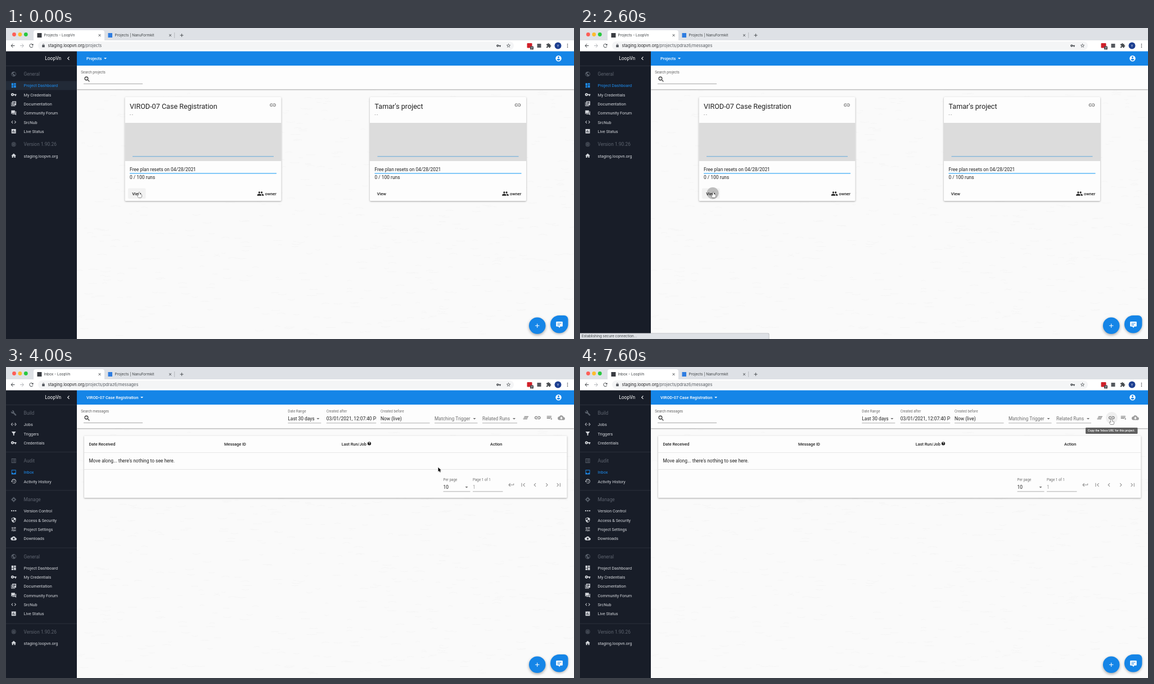
An HTML page with a canvas that plays this animation: 1010x554 px, repeating every 8 s.

```html
<!DOCTYPE html>
<html lang="en">
<head>
<meta charset="utf-8">
<title>Project inbox</title>
<style>
  html, body { margin: 0; width: 100%; height: 100%; overflow: hidden; background: #f9f9f9; }
  canvas { display: block; width: 1010px; height: 554px; }
</style>
</head>
<body>
<canvas id="stage"></canvas>
<script>
const W = 1010, H = 554, LOOP = 8000, STEP = 200;
const BLUE = '#1585e7', INK = '#212121', GREY = '#6e6e6e', PALE = '#9c9c9c';
const UI = 'Inter, "Open Sans", sans-serif', PAGE = 'Roboto, sans-serif';
const SMALL = 6.3, BODY = 7.36, LARGE = 8.42, TITLE = 12.6;

const canvas = document.getElementById('stage');
const dpr = window.devicePixelRatio || 1;
canvas.width = W * dpr;
canvas.height = H * dpr;
const ctx = canvas.getContext('2d');

// Icons live on a 24 unit grid and are filled even-odd.
const disc = (x, y, r) => `M${x - r} ${y}a${r} ${r} 0 1 0 ${2 * r} 0a${r} ${r} 0 1 0 ${-2 * r} 0z`;
const box = (x, y, w, h) => `M${x} ${y}h${w}v${h}h${-w}z`;
const cloud = 'M19.3 10A7.5 7.5 0 0 0 5.3 8 6 6 0 0 0 6 20h13a5 5 0 0 0 .3-10z';
const shapes = {
  dashboard: box(3, 3, 8, 10) + box(3, 15, 8, 6) + box(13, 11, 8, 10) + box(13, 3, 8, 6),
  key: disc(7, 12, 6) + disc(7, 12, 2) + box(13, 10, 10, 4) + box(17, 14, 4, 4),
  books: 'M4 6H2v16h16v-2H4z' + box(6, 2, 16, 16) + box(9, 5, 10, 2) + box(9, 9, 10, 2) + box(9, 13, 6, 2),
  forum: 'M22 6h-3v9H6v3h12l4 4zM17 2H2v15l4-4h11z',
  code: 'M9.4 16.6L4.8 12l4.6-4.6L8 6l-6 6 6 6zM14.6 16.6l4.6-4.6-4.6-4.6L16 6l6 6-6 6z',
  chart: box(3, 3, 18, 18) + box(7, 10, 2, 7) + box(11, 7, 2, 10) + box(15, 13, 2, 4),
  home: 'M10 20v-6h4v6h5v-8h3L12 3 2 12h3v8z',
  globe: disc(12, 12, 10) + 'M11 19.9C7 19.4 4 16 4 12l.2-1.8L9 15v1l2 2zM18 17.4L16 16h-1v-4H8v-2h3V7h3l1-2.4c3 1.2 5 4 5 7.4 0 2-.8 4-2 5.4z',
  wrench: 'M22.7 19l-9.1-9.1A6.6 6.6 0 0 0 4.7 1.7L9 6 6 9 1.6 4.7a6.6 6.6 0 0 0 8.2 8.9l9.1 9.1h1.4l2.4-2.4z',
  jobs: 'M7.8 6.8L6.2 5.5.8 12l5.4 6.5 1.6-1.3L3.4 12zM16.2 6.8l1.6-1.3 5.4 6.5-5.4 6.5-1.6-1.3 4.4-5.2z' + box(7, 11, 2, 2) + box(11, 11, 2, 2) + box(15, 11, 2, 2),
  funnel: 'M3 4h18l-7 9v7h-4v-7z',
  list: box(3, 3, 18, 18) + box(5, 5, 14, 14) + [7, 11, 15].map(y => box(7, y, 2, 2) + box(11, y, 6, 2)).join(''),
  inbox: box(3, 3, 18, 18) + 'M5 5h14v10h-4a3 3 0 0 1-6 0H5z',
  history: 'M13 3a9 9 0 0 0-9 9H1l4 4 4-4H6a7 7 0 1 1 2 5l-1.4 1.4A9 9 0 1 0 13 3zM12 8v5l4.3 2.5.7-1.2-3.5-2.1V8z',
  gear: disc(12, 12, 7.5) + disc(12, 12, 3.5) + box(10, 2, 4, 2.8) + box(10, 19.2, 4, 2.8) + box(2, 10, 2.8, 4) + box(19.2, 10, 2.8, 4),
  dots: disc(4, 12, 2.6) + disc(12, 12, 2.6) + disc(20, 12, 2.6),
  shield: 'M12 1L3 5v6c0 5.5 3.8 10.7 9 12 5.2-1.3 9-6.5 9-12V5zM12 12h7c-.5 4.1-3.3 7.8-7 8.9V12H5V6.3l7-3.1z',
  tune: box(3, 5, 10, 2) + box(15, 3, 2, 6) + box(17, 5, 4, 2) + box(3, 11, 4, 2) + box(7, 9, 2, 6) + box(11, 11, 10, 2) + box(3, 17, 6, 2) + box(11, 15, 2, 6) + box(13, 17, 8, 2),
  cloud: cloud + 'M17 13l-5 5-5-5h3V9h4v4z',
  print: disc(12, 12, 9) + disc(12, 12, 7.6) + disc(12, 12, 6) + disc(12, 12, 4.4) + disc(12, 12, 2.8),
  search: disc(9.5, 9.5, 6.5) + disc(9.5, 9.5, 4.5) + 'M14 15.5l1.5-1.5 5 5-1.5 1.5z',
  link: 'M11 7H7a5 5 0 0 0 0 10h4v-1.9H7a3.1 3.1 0 0 1 0-6.2h4zM13 7h4a5 5 0 0 1 0 10h-4v-1.9h4a3.1 3.1 0 0 0 0-6.2h-4z' + box(8, 11, 8, 2),
  group: disc(8, 8, 3) + disc(16, 8, 3) + 'M8 13c-2.3 0-7 1.2-7 3.5V19h14v-2.5C15 14.2 10.3 13 8 13zM16 13l-1 .1c1.2.8 2 2 2 3.4V19h6v-2.5c0-2.3-4.7-3.5-7-3.5z',
  account: disc(12, 12, 10) + disc(12, 8, 3) + 'M12 19.2a7 7 0 0 1-6-3.2c0-2 4-3.1 6-3.1s6 1.100 6 3.1a7 7 0 0 1-6 3.2z',
  back: 'M20 11H7.800l5.600-5.600L12 4l-8 8 8 8 1.400-1.400L7.800 13H20z',
  reload: 'M17.600 6.400A8 8 0 1 0 19.700 14h-2.100A6 6 0 1 1 12 6c1.700 0 3.100.7 4.200 1.800L13 11h7V4z',
  lock: box(4, 8, 16, 14) + 'M7 8V6a5 5 0 0 1 10 0v2h-2V6a3 3 0 0 0-6 0v2z',
  star: 'M22 9.2l-7.2-.6L12 2 9.200 8.600 2 9.200 7.500 14 5.800 21 12 17.300 18.200 21l-1.700-7zM12 15.400l-3.800 2.300 1-4.300-3.300-2.900 4.400-.4L12 6.100l1.700 4 4.400.4-3.300 2.900 1 4.300z',
  puzzle: 'M20.500 11H19V5h-6V3.500a2.500 2.500 0 0 0-5 0V5H2v5.800h1.500a2.700 2.700 0 0 1 0 5.400H2V22h5.800v-1.500a2.700 2.700 0 0 1 5.400 0V22H19v-6h1.500a2.500 2.500 0 0 0 0-5z',
  kebab: disc(12, 5, 2.2) + disc(12, 12, 2.2) + disc(12, 19, 2.2),
  left: 'M15.400 7.400L14 6l-6 6 6 6 1.400-1.400-4.600-4.600z',
  right: 'M10 6L8.600 7.400l4.600 4.600-4.600 4.600L10 18l6-6z',
  first: 'M18.400 7.400L17 6l-6 6 6 6 1.400-1.400-4.600-4.600z' + box(6, 6, 2, 12),
  last: 'M7 6L5.600 7.400l4.600 4.600-4.600 4.600L7 18l6-6z' + box(16, 6, 2, 12),
  enter: 'M19 7v4H5.800l3.600-3.600L8 6l-6 6 6 6 1.400-1.400L5.800 13H21V7z',
  clear: box(7, 7, 14, 2) + box(5, 11, 14, 2) + box(3, 15, 14, 2),
  queue: box(2, 5, 17, 2) + box(2, 9, 17, 2) + box(2, 13, 13, 2) + 'M17 13v6l5-3z',
  drop: 'M7 10l5 5 5-5z',
  close: 'M19 6.400L17.600 5 12 10.600 6.400 5 5 6.400l5.600 5.600L5 17.600 6.400 19l5.600-5.600 5.600 5.600 1.400-1.400-5.600-5.600z',
  plus: 'M19 13h-6v6h-2v-6H5v-2h6V5h2v6h6z',
  help: disc(12, 12, 10) + box(11, 17, 2, 2) + 'M8 9a4 4 0 1 1 7 2.300C13.500 12.800 13 13.500 13 15h-2c0-3 3-4 3-6a2 2 0 0 0-4 0z',
  chat: 'M4 3h16a2 2 0 0 1 2 2v11a2 2 0 0 1-2 2h-5l-3 4-3-4H4a2 2 0 0 1-2-2V5a2 2 0 0 1 2-2z' + box(6, 7, 12, 2) + box(6, 12, 8, 2)
};
const icons = {};
for (const name in shapes) icons[name] = new Path2D(shapes[name]);

function icon(name, cx, cy, size, color, turn = 0) {
  ctx.save();
  ctx.translate(cx, cy);
  ctx.rotate(turn);
  ctx.scale(size / 24, size / 24);
  ctx.translate(-12, -12);
  ctx.fillStyle = color;
  ctx.fill(icons[name], 'evenodd');
  ctx.restore();
}
function text(str, x, y, size, color, weight = 400, family = PAGE) {
  ctx.font = `${weight} ${size}px ${family}`;
  ctx.fillStyle = color;
  ctx.fillText(str, x, y);
  return x + ctx.measureText(str).width;
}
function rect(x, y, w, h, color, radius = 0) {
  ctx.fillStyle = color;
  ctx.beginPath();
  ctx.roundRect(x, y, w, h, radius);
  ctx.fill();
}
function circle(x, y, r, color) {
  ctx.fillStyle = color;
  ctx.beginPath();
  ctx.arc(x, y, r, 0, 7);
  ctx.fill();
}
function shadowed(blur, dy, alpha, draw) {
  ctx.save();
  ctx.shadowColor = `rgba(0,0,0,${alpha})`;
  ctx.shadowBlur = blur * dpr;
  ctx.shadowOffsetY = dy * dpr;
  draw();
  ctx.restore();
}

// Faint paper grain behind the page.
const grain = new Path2D();
let seed = 7;
const random = () => (seed = seed * 16807 % 2147483647) / 2147483647;
for (let i = 0; i < 650; i++) {
  const x = 126 + random() * 884, y = 110 + random() * 440, w = 6 + random() * 12;
  grain.moveTo(x, y);
  grain.quadraticCurveTo(x + w / 2, y + random() * 8 - 4, x + w, y);
}

function browser(title, path) {
  rect(0, 0, W, 22, '#dee1e6');
  ['#fe5f57', '#febc2e', '#28c840'].forEach((c, i) => circle(14.5 + i * 10.4, 11.5, 3.4, c));
  rect(49, 4, 126, 19, '#fff', [4, 4, 0, 0]);
  rect(55.5, 9, 8, 8, '#3a3d42');
  text(title + ' - LoopVn', 67.5, 15.3, 6.5, '#3c4043', 400, UI);
  icon('close', 166.5, 13, 7.5, '#45494d');
  rect(181.5, 9, 7.5, 8, '#2f7de0');
  text('Projects | NanuFormkit', 193.5, 15.3, 6.5, '#3c4043', 400, UI);
  icon('close', 292, 13, 7.5, '#45494d');
  rect(299.5, 8, 0.6, 10, '#9a9da2');
  icon('plus', 312.5, 13, 10, '#45494d');

  rect(0, 22, W, 19.5, '#fff');
  icon('back', 12, 31.5, 10.5, '#45494d');
  icon('back', 28.500, 31.5, 10.5, '#b4b7bb', Math.PI);
  icon('reload', 45, 31.5, 10.5, '#45494d');
  rect(57, 24, 846, 15, '#f4f5f6', 7.5);
  icon('lock', 66.5, 31.3, 6.8, '#50545a');
  const end = text('staging.loopvn.org', 74.5, 34.2, BODY, '#202124', 400, UI);
  text(path, end, 34.2, BODY, '#555a60', 400, UI);
  icon('key', 876, 31.5, 8.5, '#45494d');
  icon('star', 893.5, 31.3, 9, '#45494d');
  rect(926.5, 27, 9, 8.5, '#d0202a', 1);
  rect(932, 32.5, 6, 6, '#4a4d52', 1);
  text('7', 933.4, 37.5, 5, '#fff', 500, UI);
  rect(944.5, 28, 7, 7, '#55595e');
  icon('puzzle', 965, 31.3, 9.5, '#45494d');
  circle(981.5, 31.5, 6, '#1d3f91');
  text('T', 979.800, 34, 6, '#fff', 400, PAGE);
  icon('kebab', 998.5, 31.5, 9, '#45494d');
}

const GENERAL = [['dashboard', 'Project Dashboard'], ['key', 'My Credentials'], ['books', 'Documentation'],
  ['forum', 'Community Forum'], ['code', 'SrcNub'], ['chart', 'Live Status']];
const BUILD = [['jobs', 'Jobs'], ['funnel', 'Triggers'], ['key', 'Credentials']];
const AUDIT = [['inbox', 'Inbox'], ['history', 'Activity History']];
const MANAGE = [['dots', 'Version Control'], ['shield', 'Access & Security'], ['tune', 'Project Settings'], ['cloud', 'Downloads']];

function heading(y, glyph, label) {
  icon(glyph, 13.7, y, 10.5, '#59606b');
  text(label, 31.5, y + 3, LARGE, '#5d636e');
}
function section(y, glyph, label, items, active) {
  heading(y, glyph, label);
  items.forEach(([itemIcon, name], i) => {
    const color = name === active ? '#1d8df0' : '#d3d6db', row = y + 20.5 + i * 16.33;
    icon(itemIcon, 13.7, row - 0.3, 10.5, color);
    text(name, 31.5, row + 2.7, BODY, color);
  });
}
function footer(y) {
  heading(y, 'print', 'Version 1.90.26');
  icon('home', 13.7, y + 20.3, 10.5, '#d3d6db');
  text('staging.loopvn.org', 31.5, y + 23.4, BODY, '#d3d6db');
}
function sidebar(inbox, focused) {
  rect(0, 41, 126, H - 41, '#181d28');
  const rule = y => rect(0, y, 126, 0.7, '#303641');
  text('LoopVn', 69.3, 57.300, LARGE, '#fff');
  icon('left', 111, 54.2, 12.6, '#fff');
  rule(67);
  if (inbox) {
    section(82, 'wrench', 'Build', BUILD);
    section(167, 'list', 'Audit', AUDIT, 'Inbox');
    section(236, 'gear', 'Manage', MANAGE);
    section(337.5, 'globe', 'General', GENERAL);
    [151, 219.5, 321.8, 456.7].forEach(rule);
    footer(471.5);
  } else {
    if (focused) rect(0, 94.5, 126, 16, '#222a37');
    section(82, 'globe', 'General', GENERAL, 'Project Dashboard');
    footer(207.2);
  }
}

function frame(heading, searchLabel) {
  rect(126, 41, 884, H - 41, '#fafafa');
  ctx.strokeStyle = '#f4f4f4';
  ctx.lineWidth = 0.8;
  ctx.stroke(grain);
  shadowed(2, 0.7, 0.35, () => rect(126, 67, 884, 42, '#fdfdfd'));
  rect(126, 41, 884, 26, BLUE);
  const end = text(heading, 143, 57, BODY, '#fff', 500);
  icon('drop', end + 6.300, 54, 12, '#fff');
  icon('account', 982.500, 54.2, 12.6, '#fff');
  text(searchLabel, 133.3, 80.6, SMALL, '#666');
  icon('search', 144.3, 91.3, 12.6, INK);
  rect(138, 99, 105, 0.7, '#8c8c8c');
}

function card(x, title, hover, ripple) {
  shadowed(3, 1, 0.35, () => rect(x, 123, 278, 185, '#fdfdfd', 1.5));
  text(title, x + 8.5, 143.8, TITLE, INK);
  text('- -', x + 8.5, 156.5, BODY, GREY);
  icon('link', x + 263, 137.2, 12.6, '#737373');
  rect(x, 169, 278, 68, '#dcdcdc');
  rect(x + 13.5, 228.4, 251, 0.9, '#3a98dc');
  text('Free plan resets on 04/28/2021', x + 8.5, 254.6, LARGE, INK);
  rect(x + 8.5, 258, 261, 2.1, '#83c9f8');
  text('0 / 100 runs', x + 8.5, 269.2, LARGE, INK);
  if (hover) rect(x + 5.5, 285.5, 31.5, 18.5, '#f2f2f2', 2);
  if (ripple) circle(236, 294.3, 10.6, '#bdbdbd');
  text('View', x + 12.8, 297.7, BODY, INK, 500);
  icon('group', x + 241, 295, 12.6, INK);
  text('owner', x + 249, 297.7, BODY, INK, 500);
}
function projects(clicked) {
  frame('Projects', 'Search projects');
  card(211.5, 'VIROD-07 Case Registration', true, clicked);
  card(647, "Tamar's project", false, false);
}

function field(x, w, label, value, drop, color = INK) {
  if (label) text(label, x, 81.300, SMALL, GREY);
  ctx.save();
  ctx.beginPath();
  ctx.rect(x, 83, w, 20);
  ctx.clip();
  text(value, x, 94.800, LARGE, color);
  ctx.restore();
  if (drop) icon('drop', x + w - 5.500, 92, 12, GREY);
  rect(x, 99.5, w, 0.7, '#929292');
}
function messages(hover) {
  frame('VIROD-07 Case Registration', 'Search messages');
  field(501.300, 59, 'Date Range', 'Last 30 days', true);
  field(569.700, 88.5, 'Created after', '03/01/2021, 12:07:40 PM', false);
  field(666, 87.5, 'Created before', 'Now (live)', false);
  field(762, 76.5, '', 'Matching Trigger', true, GREY);
  field(847, 62, '', 'Related Runs', true, GREY);
  if (hover) circle(945.500, 90.500, 10.5, '#efefef');
  icon('clear', 924.300, 90.300, 12.6, '#666');
  icon('link', 945.300, 90.300, 12.6, '#666');
  icon('queue', 966.500, 90.500, 11.5, '#666');
  icon('cloud', 987.500, 90.300, 12.6, PALE);

  shadowed(3, 1, 0.35, () => rect(139, 122.5, 858.5, 110.5, '#fdfdfd', 1));
  [[147.5, 'Date Received'], [388, 'Message ID'], [596.700, 'Last Run/Job'], [861, 'Action']]
    .forEach(([x, label]) => text(label, x, 140, BODY, INK, 500));
  icon('help', 646, 136.300, 7.600, INK);
  rect(139, 152, 858.5, 0.7, '#e0e0e0');
  text("Move along... there's nothing to see here.", 147.5, 170, LARGE, INK);
  rect(139, 182, 858.5, 0.7, '#dcdcdc');
  text('Per page', 777.5, 203.200, SMALL, GREY);
  text('10', 777.5, 216.800, LARGE, INK);
  icon('drop', 819, 214, 12, GREY);
  rect(777.5, 221.5, 48, 0.7, '#929292');
  text('Page 1 of 1', 830, 203.200, SMALL, GREY);
  text('1', 830, 216.800, LARGE, PALE);
  rect(830, 221.5, 53.5, 0.7, '#929292');
  ['enter', 'first', 'left', 'right', 'last'].forEach((name, i) =>
    icon(name, 898.500 + i * 21.05, 210, 12.6, '#8f8f8f'));
}

function floatingButtons() {
  shadowed(5, 2, 0.35, () => circle(944.700, 530.300, 14.8, BLUE));
  icon('plus', 944.700, 530.300, 12.6, '#fff');
  shadowed(4, 1.5, 0.3, () => rect(968, 512, 31.5, 31.5, BLUE, [15.7, 7, 15.7, 15.7]));
  icon('chat', 984, 528.300, 14, '#fff');
}
function status() {
  rect(-1, 543.5, 337.5, 12, '#b9bcc1', [0, 2, 0, 0]);
  rect(-1, 544.2, 336.7, 11, '#dee1e6', [0, 2, 0, 0]);
  text('Establishing secure connection...', 3, 551.300, SMALL, '#3c4043', 400, UI);
}
function tooltip(alpha) {
  ctx.globalAlpha = alpha;
  rect(899, 108, 92.5, 11, '#5f5f5f', 1.2);
  text("Copy the 'Inbox URL' for this project.", 903, 115.300, 5.26, '#fff', 500);
  ctx.globalAlpha = 1;
}

const arrow = new Path2D('M0 0V7.600L1.700 6 3 8.800 4.300 8.200 3.100 5.500H5.400z');
const hand = new Path2D('M-.9 0Q0-.9.9 0V3L3 3.300 4.500 4.200V6.500L3.500 9H-1.500L-3.500 5.500Q-3.700 4.200-2.300 4.600L-.9 5.800z');
function pointer(x, y, overLink) {
  ctx.save();
  ctx.translate(x, y);
  ctx.lineJoin = 'round';
  ctx.lineWidth = overLink ? 0.9 : 1.1;
  ctx.strokeStyle = overLink ? '#111' : '#fff';
  ctx.fillStyle = overLink ? '#fff' : '#000';
  const shape = overLink ? hand : arrow;
  ctx.stroke(shape);
  ctx.fill(shape);
  ctx.restore();
}

// Pointer route: [ms, x, y], a fast sweep that settles on the link button.
const route = [[3400, 236.500, 292], [3600, 330, 276], [3800, 590, 226], [4000, 768.500, 178.800],
  [4200, 852, 149], [4400, 903, 122], [4600, 931, 104], [4800, 943, 96], [5000, 945, 93.5]];
function pointerAt(t) {
  const next = route.findIndex(p => p[0] > t);
  if (next < 0) return route[route.length - 1].slice(1);
  if (next === 0) return route[0].slice(1);
  const [t0, x0, y0] = route[next - 1], [t1, x1, y1] = route[next];
  const k = (t - t0) / (t1 - t0);
  return [x0 + (x1 - x0) * k, y0 + (y1 - y0) * k];
}

function draw(now) {
  const t = Math.floor((now % LOOP) / STEP) * STEP;
  const clicked = t >= 2600, inbox = t >= 2800, overLink = t >= 4800;
  ctx.setTransform(dpr, 0, 0, dpr, 0, 0);
  if (inbox) messages(overLink); else projects(clicked);
  sidebar(inbox, !clicked);
  browser(inbox ? 'Inbox' : 'Projects', clicked ? '/projects/pdraz6/messages' : '/projects');
  floatingButtons();
  if (clicked && t < 3000) status();
  if (t >= 5200) tooltip(t < 5400 ? 0.42 : 1);
  if (inbox) pointer(...pointerAt(t), overLink);
  else pointer(237, 293, true);
  requestAnimationFrame(draw);
}
requestAnimationFrame(draw);
</script>
</body>
</html>
```
